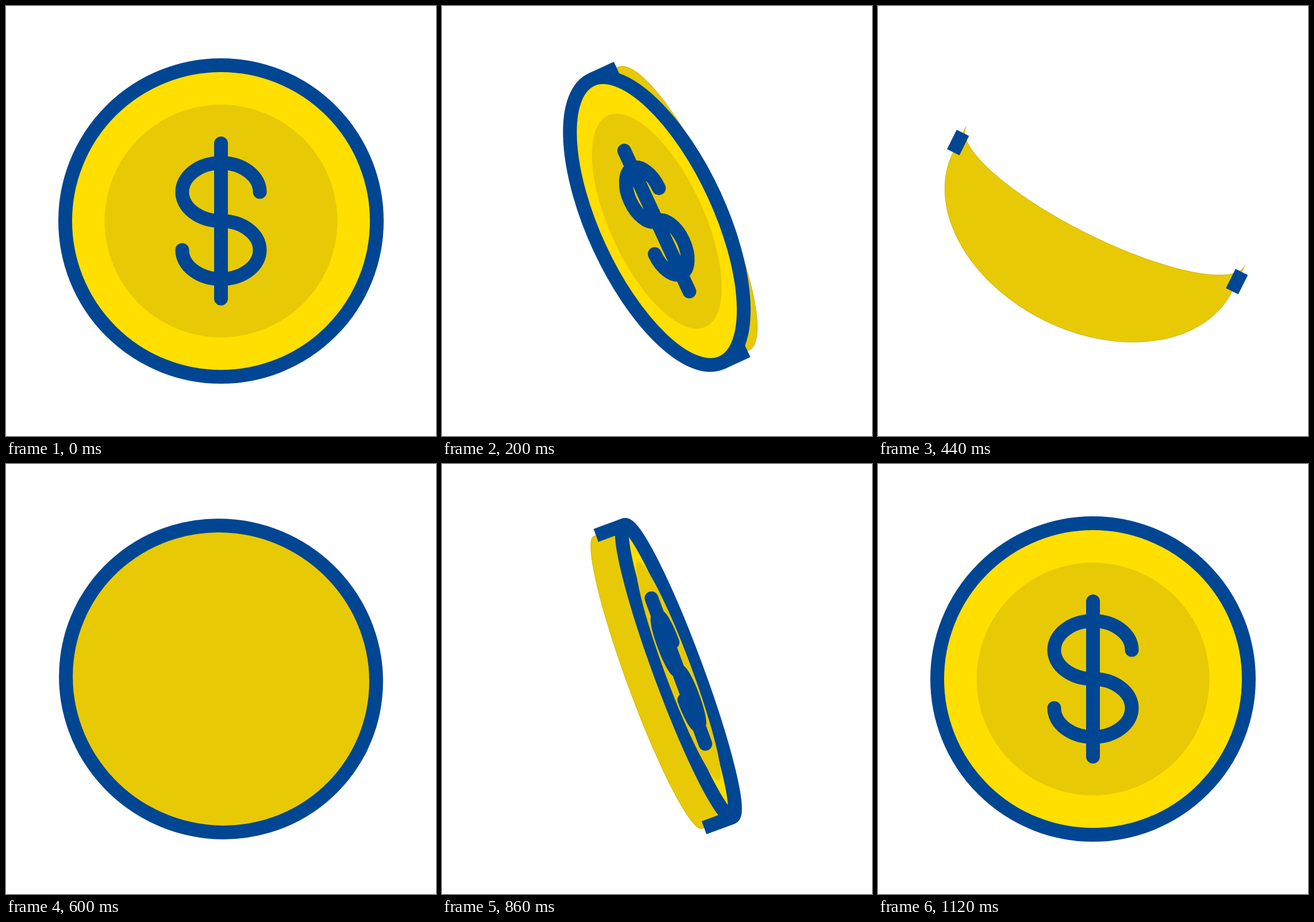
These frames come from a looping animation (748 by 748 pixels, 1400 ms). An HTML page with a canvas:

```html
<!DOCTYPE html>
<html lang="en">
<head>
<meta charset="utf-8">
<title>Spinning coin</title>
<style>
  html, body { margin: 0; width: 100%; height: 100%; overflow: hidden; background: #fff; }
  canvas { display: block; width: 100vw; height: 100vh; }
</style>
</head>
<body>
<canvas id="stage" width="748" height="748"></canvas>
<script>
const ctx = document.getElementById('stage').getContext('2d');
const SIZE = 748, LOOP = 1400, STEP = 20, SPIN_END = 1120;
const BLUE = '#004693', GOLD = '#ffdf00', DARK = '#e7ca05', EDGE = '#cdb40c';
const RADIUS = 271, DISC = 202.5, DEPTH = 53, LINE = 24;
const HALF_TURN = 560, EDGE_ON = 840;

// [time, value] keys
const SPIN = [[0, 0], [200, 66.1], [440, 134.8], [720, 234.1], [860, 276.6], [960, 306.1], [1120, 360]];
const TILT = [[0, 0], [200, 24.8], [440, 63.5], [560, 66.5], [720, 41.8], [860, 20.3], [960, 7.15], [1120, 0]];
const FRONT_Z = [[560, 53], [720, 53], [860, 40], [960, 24.7], [1120, 0]];
const BULGE = [[840, -12], [860, -7], [960, 28], [1120, 50]];

// Smooth curve through the keys
function curve(keys, t) {
  const last = keys.length - 1;
  if (t <= keys[0][0]) return keys[0][1];
  if (t >= keys[last][0]) return keys[last][1];
  const slope = i => {
    const a = keys[Math.max(i - 1, 0)], b = keys[Math.min(i + 1, last)];
    return (b[1] - a[1]) / (b[0] - a[0]);
  };
  const i = keys.findIndex(k => k[0] > t) - 1;
  const [t0, v0] = keys[i], [t1, v1] = keys[i + 1];
  const d = t1 - t0, u = (t - t0) / d, w = 1 - u;
  return w * w * ((1 + 2 * u) * v0 + u * d * slope(i)) +
         u * u * ((3 - 2 * u) * v1 - w * d * slope(i + 1));
}

// Half ellipse from top to bottom, or back when dir is -1
function halfArc(ends, apex, dir) {
  for (let i = 0; i <= 80; i++) {
    const a = dir * (i / 80 - 0.5) * Math.PI;
    ctx.lineTo(ends + (apex - ends) * Math.cos(a), RADIUS * Math.sin(a));
  }
}

function drawWall(near, far) {
  ctx.beginPath();
  halfArc(near.ends, near.apex, 1);
  halfArc(far.ends, far.apex, -1);
  ctx.closePath();
  ctx.fillStyle = DARK;
  ctx.fill();
  ctx.strokeStyle = EDGE;
  ctx.lineWidth = 1;
  ctx.stroke();
}

function drawTabs(from, to) {
  ctx.lineCap = 'butt';
  ctx.beginPath();
  for (const y of [-RADIUS, RADIUS]) {
    ctx.moveTo(from, y);
    ctx.lineTo(to, y);
  }
  ctx.stroke();
}

function oval(x, radius, squash) {
  ctx.beginPath();
  ctx.ellipse(x, 0, radius * squash, radius, 0, 0, 2 * Math.PI);
}

function drawFace(x, squash, fill) {
  oval(x, RADIUS, squash);
  ctx.fillStyle = fill;
  ctx.fill();
  ctx.stroke();
}

function drawDollar(x, squash) {
  oval(x, DISC, squash);
  ctx.fillStyle = DARK;
  ctx.fill();
  const rx = 67.5 * squash, ry = 50.5;
  ctx.lineCap = 'round';
  ctx.beginPath();
  ctx.ellipse(x, -ry, rx, ry, 0, 0, Math.PI / 2, true);
  ctx.ellipse(x, ry, rx, ry, 0, -Math.PI / 2, Math.PI);
  ctx.moveTo(x, -135);
  ctx.lineTo(x, 135);
  ctx.stroke();
}

function draw(t) {
  const spin = curve(SPIN, t) * Math.PI / 180;
  const tilt = curve(TILT, t) * Math.PI / 180;
  const cos = Math.cos(spin), sin = Math.sin(spin);
  const project = (x, z) => x * cos - z * sin;
  const firstHalf = t < HALF_TURN;
  const drift = (t / 440) ** 2;
  const frontZ = firstHalf ? 2 * drift : curve(FRONT_Z, t), rearZ = frontZ - DEPTH;
  const front = project(0, frontZ), rear = project(0, rearZ);

  ctx.setTransform(1, 0, 0, 1, 0, 0);
  ctx.fillStyle = '#fff';
  ctx.fillRect(0, 0, SIZE, SIZE);
  ctx.translate(SIZE / 2, SIZE / 2);
  ctx.rotate(-tilt);
  ctx.lineJoin = 'round';

  if (firstHalf) {
    drawWall({ ends: front, apex: project(RADIUS, frontZ) },
             { ends: project(0, -DEPTH - 15 * drift), apex: project(112, -77) });
  } else if (t < EDGE_ON) {
    drawWall({ ends: rear, apex: project(-RADIUS, rearZ) },
             { ends: front, apex: project(-RADIUS, frontZ - 11) });
  } else {
    drawWall({ ends: front, apex: project(-RADIUS, frontZ) },
             { ends: project(0, rearZ - 4), apex: project(-RADIUS, rearZ + curve(BULGE, t)) });
  }

  ctx.strokeStyle = BLUE;
  ctx.lineWidth = LINE;
  drawTabs(front, rear);
  if (cos > 0) {
    drawFace(front, cos, GOLD);
    drawDollar(front, cos);
  } else if (!firstHalf) {
    drawFace(rear, -cos, DARK);
  }
}

function tick() {
  const t = Math.floor((performance.now() % LOOP) / STEP) * STEP;
  draw(Math.min(t, SPIN_END));
  requestAnimationFrame(tick);
}
tick();
</script>
</body>
</html>
```
